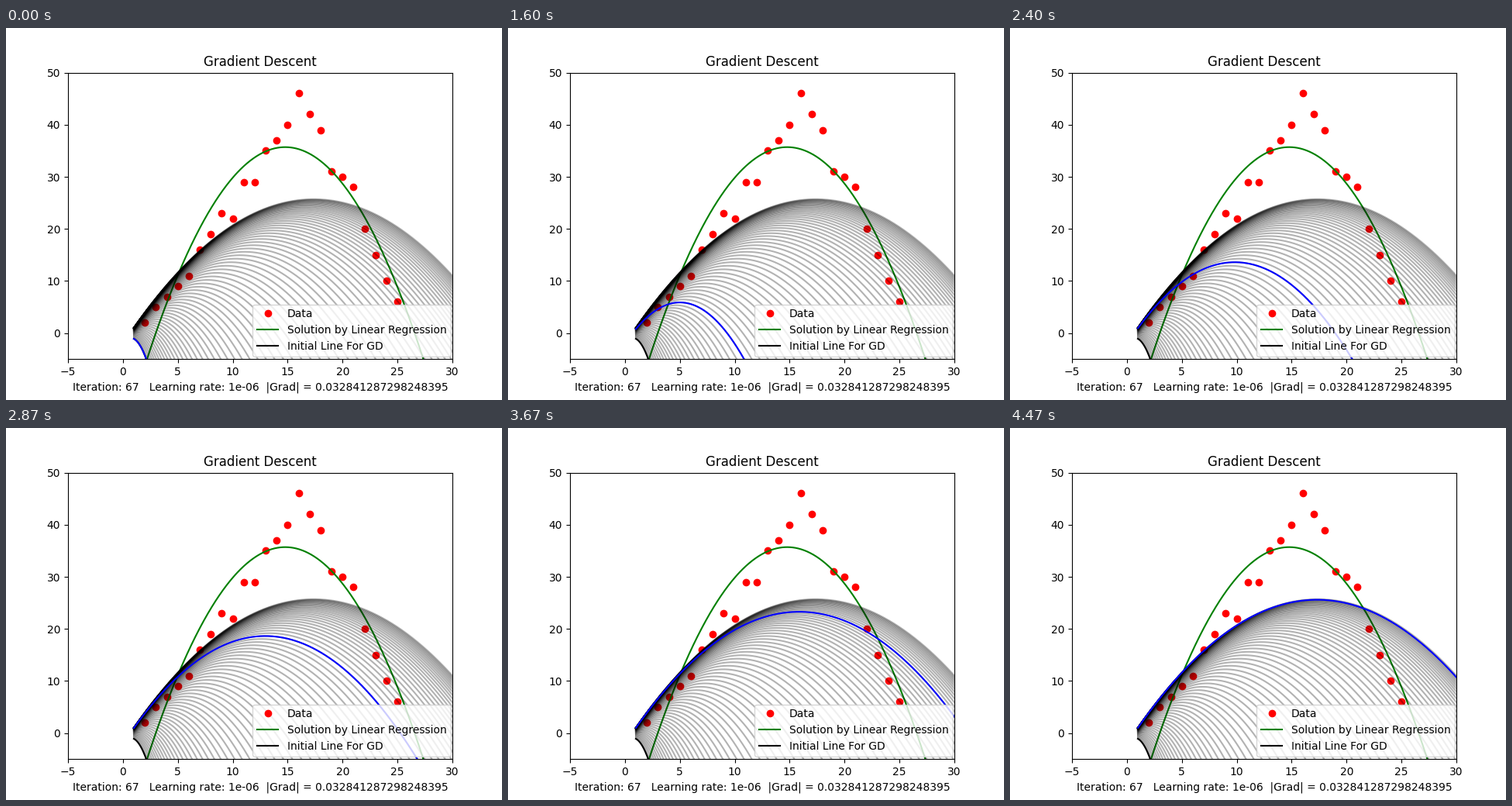
Animation, 640 px wide and 480 px high, one loop 4540 ms. Source, as a matplotlib script:

```python
import numpy as np
import matplotlib.pyplot as plt
from matplotlib.animation import FuncAnimation

LOOP_MS = 4540
STEPS = 67
RATE = 1e-6

x = np.arange(2, 26, dtype=float)
y = np.array([2, 5, 7, 9, 11, 16, 19, 23, 22, 29, 29, 35,
              37, 40, 46, 42, 39, 31, 30, 28, 20, 15, 10, 6], dtype=float)


def features(v):
    return np.column_stack((v**2, v, np.ones_like(v)))


def descend(start):
    """Return the coefficients at every step of gradient descent."""
    A = features(x)
    path = [np.array(start)]
    for _ in range(STEPS):
        w = path[-1]
        path.append(w - RATE * A.T @ (A @ w - y) / len(x))
    return path


grid = features(np.linspace(1, 46, 1500))
best = np.linalg.lstsq(features(x), y, rcond=None)[0]
curves = [grid @ w for w in descend([-2.1, 3.1, -2.1])]
xs = grid[:, 1]

fig, ax = plt.subplots(figsize=(6.4, 4.8), dpi=100)
ax.set(xlim=(-5, 30), ylim=(-5, 50), title="Gradient Descent")
ax.set_xlabel("Iteration: 67   Learning rate: 1e-06  "
              "|Grad| = 0.032841287298248395")

ax.plot(x, y, "ro", label="Data")
ax.plot(xs, grid @ best, color="green", label="Solution by Linear Regression")
ax.plot(xs, curves[0], color="black", label="Initial Line For GD")
for curve in curves:
    ax.plot(xs, curve, color="black", alpha=0.3)
current, = ax.plot(xs, curves[0], color="blue")
ax.legend(loc=(0.48, 0.01))


def update(i):
    current.set_ydata(curves[i])
    return current,


anim = FuncAnimation(fig, update, frames=len(curves),
                     interval=LOOP_MS / len(curves),
                     repeat=True, repeat_delay=0, blit=False)
plt.show()
```
